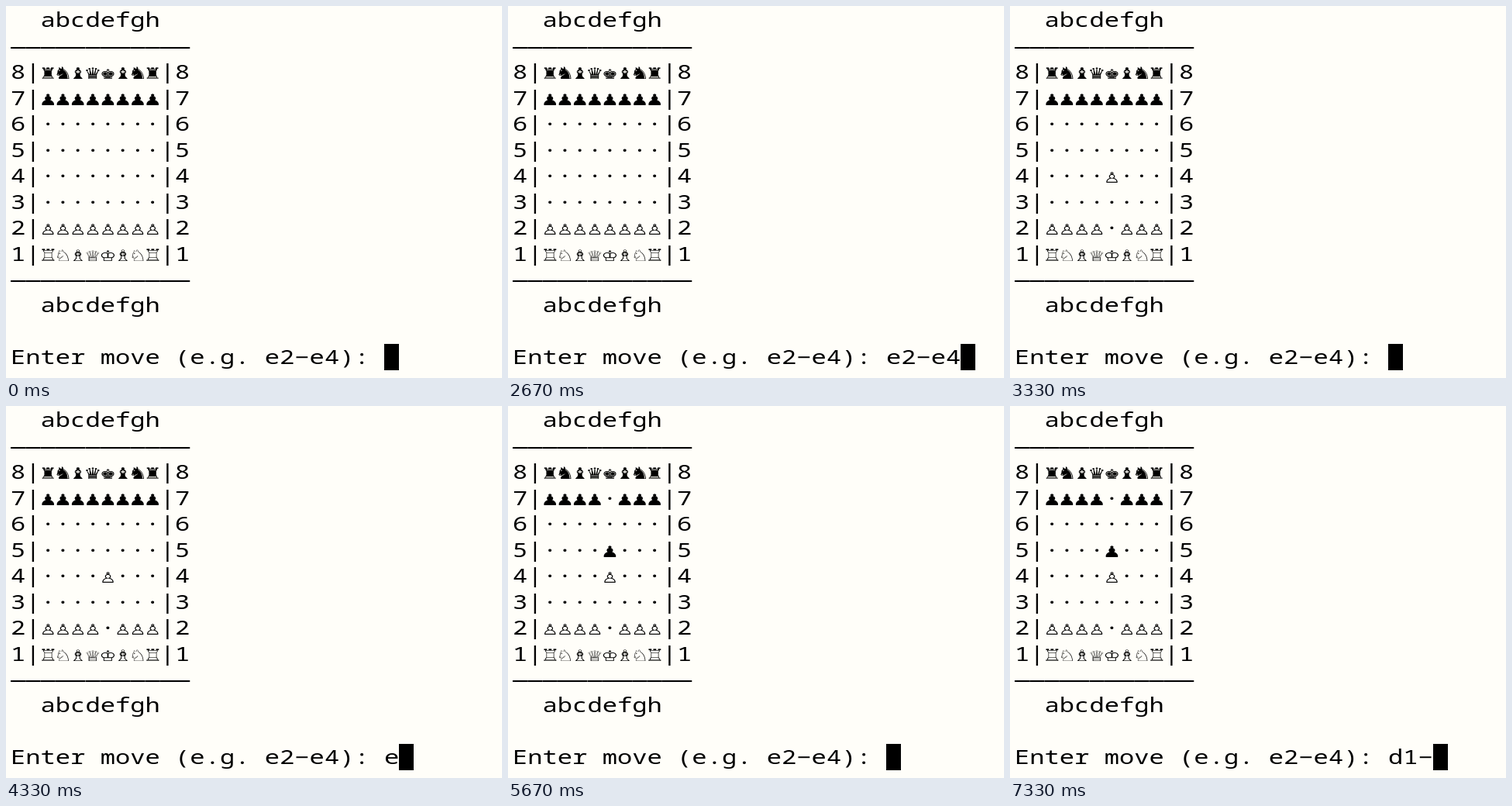
An HTML page with a canvas for the animation above (8 s loop, 640 px wide and 480 px high).

```html
<!DOCTYPE html>
<html lang="en">
<head>
<meta charset="utf-8">
<title>Terminal chess</title>
<style>
  html, body { margin: 0; width: 100%; height: 100%; overflow: hidden; background: #fffef9; }
  canvas { display: block; }
</style>
</head>
<body>
<canvas id="screen" width="640" height="480"></canvas>
<script>
const LOOP = 8000;
const LEFT = 6, TOP = 1, CELL = 19.28, ROW = 33.46;
const SIZE = 24.6, BASELINE = 26.4;
const TEXT_FONT = '"Noto Sans Mono", "DejaVu Sans Mono", monospace';
const PIECE_FONT = '"DejaVu Sans Mono", "DejaVu Sans", monospace';
const PROMPT = 'Enter move (e.g. e2−e4): ';

// What has been typed after the prompt, from each time on
const typed = [
  [0, ''], [2000, 'e2'], [2330, 'e2−e'], [2670, 'e2−e4'], [3000, 'e2−e4\n'],
  [3330, ''], [4330, 'e'], [4670, 'e7−'], [5000, 'e7−e5'],
  [5670, ''], [7000, 'd'], [7330, 'd1−']
];
const moves = [[3330, 'e2', 'e4'], [5670, 'e7', 'e5']];

const ctx = document.getElementById('screen').getContext('2d');
ctx.textAlign = 'center';

const isPiece = ch => ch >= '♔' && ch <= '♟';
const square = name => [8 - name[1], 'abcdefgh'.indexOf(name[0])];

function board(t) {
  const empty = '·'.repeat(8);
  const ranks = ['♜♞♝♛♚♝♞♜', '♟'.repeat(8), empty, empty, empty, empty,
    '♙'.repeat(8), '♖♘♗♕♔♗♘♖'].map(rank => [...rank]);
  for (const [time, from, to] of moves) {
    if (t < time) continue;
    const [r, c] = square(from), [r2, c2] = square(to);
    ranks[r2][c2] = ranks[r][c];
    ranks[r][c] = '·';
  }
  return ranks.map((rank, i) => `${8 - i}|${rank.join('')}|${8 - i}`);
}

function screenLines(t) {
  const input = typed.filter(([time]) => time <= t).pop()[1];
  const files = '  abcdefgh', rule = '—'.repeat(12);
  const lines = [files, rule, ...board(t), rule, files, '', ...(PROMPT + input).split('\n')];
  return lines.slice(-14);
}

// The terminal's cells are wider than the font's, so every glyph is widened alike
ctx.font = `${SIZE}px ${TEXT_FONT}`;
const advance = ctx.measureText('0').width;
const stretch = CELL / advance;

ctx.font = `${SIZE}px ${PIECE_FONT}`;
const pieceSize = SIZE * Math.min(1, advance * 1.02 / ctx.measureText('♜').width);

function drawChar(ch, col, row) {
  ctx.font = isPiece(ch) ? `${pieceSize}px ${PIECE_FONT}` : `${SIZE}px ${TEXT_FONT}`;
  ctx.setTransform(stretch, 0, 0, 1, LEFT + (col + 0.5) * CELL, TOP + row * ROW + BASELINE);
  ctx.fillText(ch, 0, 0);
}

function draw(now) {
  const lines = screenLines(now % LOOP);
  ctx.resetTransform();
  ctx.fillStyle = '#fffef9';
  ctx.fillRect(0, 0, 640, 480);
  ctx.fillStyle = '#000';

  const last = lines.length - 1;
  ctx.fillRect(Math.round(LEFT + lines[last].length * CELL), Math.round(TOP + last * ROW), 19, 34);

  lines.forEach((line, row) => [...line].forEach((ch, col) => {
    if (ch !== ' ') drawChar(ch, col, row);
  }));
  requestAnimationFrame(draw);
}
requestAnimationFrame(draw);
</script>
</body>
</html>
```
